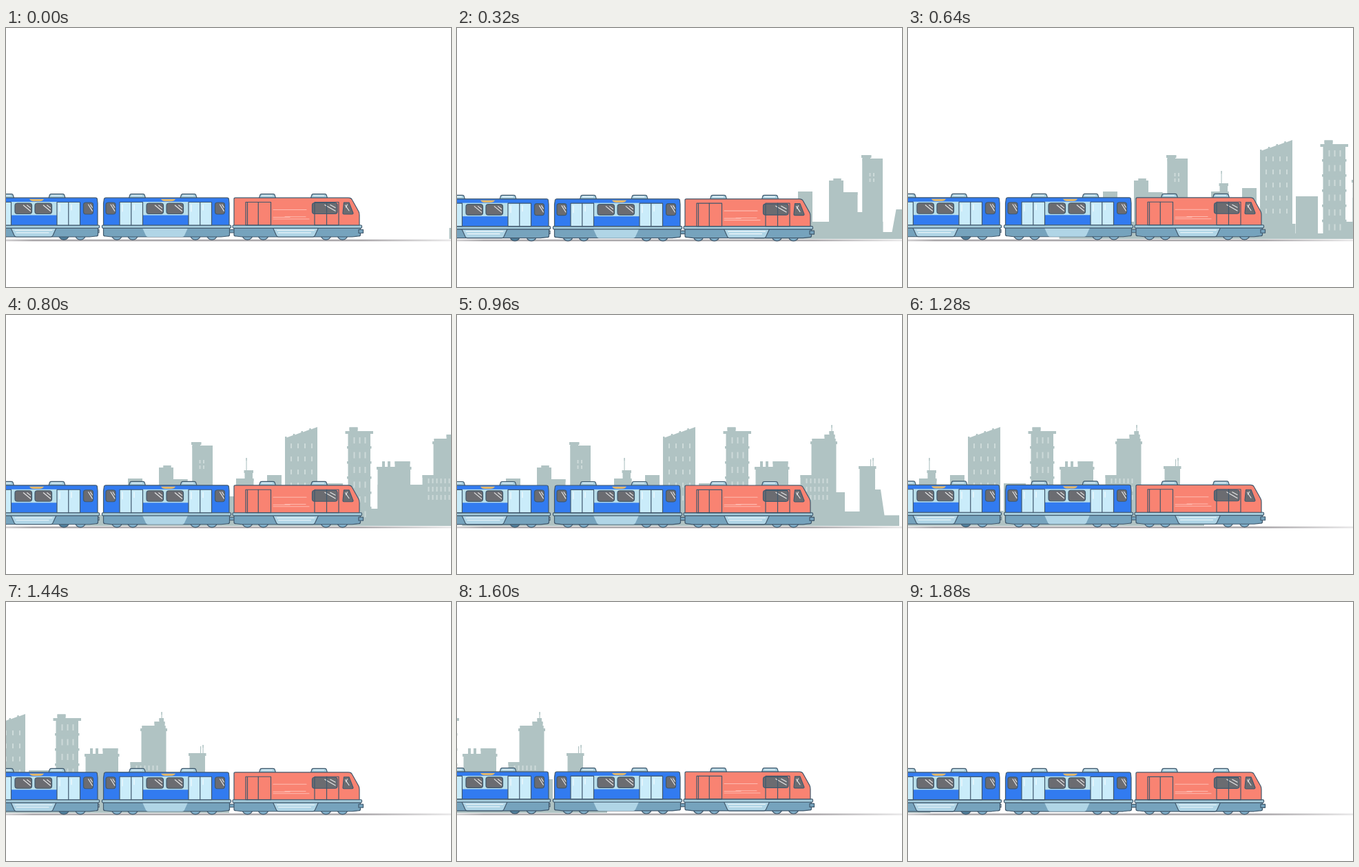
These frames come from a looping animation (646x377 px, 1.92 s). An HTML page:

```html
<!DOCTYPE html>
<html lang="en">
<head>
<meta charset="utf-8">
<title>Train</title>
<style>
  html, body { margin: 0; width: 100%; height: 100%; overflow: hidden; background: #fff; }
  svg { display: block; width: 646px; height: 377px; }
  .line { stroke: #41596d; stroke-width: 1.2; stroke-linejoin: round; stroke-linecap: round; }
  .shine, .streak { stroke: #fff; stroke-width: 1.1; stroke-linecap: round; opacity: .85; }
  .streak { stroke: #ffc6bc; }
</style>
</head>
<body>
<svg viewBox="0 0 646 377">
  <defs>
    <linearGradient id="fade">
      <stop offset="0" stop-color="#aaa7aa" stop-opacity=".55"/>
      <stop offset=".06" stop-color="#aaa7aa"/>
      <stop offset=".8" stop-color="#aaa7aa"/>
      <stop offset="1" stop-color="#aaa7aa" stop-opacity=".25"/>
    </linearGradient>
  </defs>
  <rect y="307.8" width="646" height="2.6" fill="url(#fade)"/>
  <g id="city"></g>
  <g id="train"></g>
</svg>
<script>
const STEP = 40, COUNT = 48;
const CITY_START = 643.5, CITY_SPEED = 26.5;
const GROUND = 307, FLOOR = 287;

const STONE = '#b0c3c3', PANE = '#cddad9';
const BLUE = '#327bf0', RED = '#f98372', GLASS = '#6b6c71';
const BAR = '#a6cddd', SKIRT = '#76a3bd', PALE = '#b0d5e6', WHEEL = '#83b2cd', DARK_WHEEL = '#4f7f9c';

const path = (d, fill = 'none', cls = '') => `<path d="${d}" fill="${fill}" class="${cls}"/>`;
const line = (d, cls = 'line') => path(d, 'none', cls);
const rect = (x, y, w, h, fill, cls = '', r = 0) =>
  `<rect x="${x}" y="${y}" width="${w}" height="${h}" rx="${r}" fill="${fill}" class="${cls}"/>`;
const repeat = (n, make) => Array.from({ length: n }, (_, i) => make(i)).join('');

// A building down to the ground; its cornice sticks out on both sides
const tower = (x, w, top, cornice = 0) =>
  rect(x, top, w, GROUND - top, STONE) + rect(x - cornice, top, w + 2 * cornice, 4, STONE);
const spire = (x, top) => tower(x, 1.1, top);
const panes = (x, y, cols, rows, dx, dy, h) =>
  repeat(rows, r => repeat(cols, c => rect(x + c * dx, y + r * dy, 2, h, PANE)));

// Saw-toothed roof climbing to the right
function sawTower(x, w, top, teeth) {
  const run = w / teeth;
  const roof = repeat(teeth, i => `L${x + i * run} ${top - 4 * i}h2.5v1.5L${x + (i + 1) * run} ${top - 4 * i - 2}`);
  return path(`M${x} ${GROUND}${roof}V${GROUND}Z`, STONE) + panes(x + 8, top + 10, teeth, 5, 10, 19, 7);
}

function balconyTower(x, w, top) {
  return tower(x, w, top, 4) + tower(x + 2, 12, top - 5.5) +
    repeat(5, i => rect(x - 1.5, top + 22 * (i + 1), w + 3, 3.5, STONE)) +
    panes(x + 8, top + 9, 3, 6, 8, 21.5, 9);
}

function city() {
  const ground = 'M0 307V291H64V282H149V268H158V282H187V297H200L206 264H250V285H343V299H414V282H426V247H495V258H555.5V286H578V254H607.5L613 291.5H634.5V307Z';
  return path(ground, STONE) +
    tower(63.5, 21, 238) +
    tower(108.5, 21, 222) + tower(115, 11, 219) + tower(129, 21, 239) +
    tower(157, 29.5, 190) + tower(157, 11.5, 185, 1.5) + panes(167, 211, 2, 2, 5.5, 8, 5) +
    tower(220.5, 25.5, 238) + tower(233, 11.5, 226, 1) + spire(235, 208) +
    tower(265.5, 21, 233) +
    sawTower(291.5, 47, 177, 4) +
    tower(343.5, 32, 245) +
    balconyTower(383, 32.5, 169) +
    tower(426, 47.5, 221, 1.5) + tower(432.5, 4, 213) + tower(440.5, 4, 213) + tower(451, 22, 213) +
    tower(491, 17, 233) + tower(508, 34, 180) + tower(507, 36, 184, 1.5) +
    tower(526, 15, 174) + tower(533, 6.5, 169) + spire(536, 160) + panes(499, 238, 6, 3, 6, 12, 7) +
    tower(577, 22.5, 220, 1.5) + spire(592.5, 210) + spire(596, 208);
}

const roofBox = x =>
  path(`M${x} 247.5l1.5-4.8q.5-1 2.5-1h16q2 0 2.5 1l1.5 4.8Z`, BAR, 'line') + line(`M${x + 4} 244h15`, 'shine');

const wheel = (x, fill = WHEEL) => `<circle cx="${x}" cy="300.7" r="7.6" fill="${fill}" class="line"/>`;

const glass = (x, y, w, h) =>
  rect(x, y, w, h, GLASS, 'line', 3.5) +
  line(`M${x + w * .5} ${y + 3}l${w * .42} ${h * .55}M${x + w * .72} ${y + 3}l${w * .2} ${h * .25}`, 'shine');

const door = (x, w, fill = 'none') =>
  rect(x, 253.5, w, FLOOR - 253.5, fill, 'line') + line(`M${x + w / 2} 253.5V${FLOOR}`);

// Wheels, skirt with its tapered middle panel, and the floor bar
function chassis(x, w, panel, edged, rearWheel) {
  let out = wheel(panel - 37) + wheel(panel - 14) + wheel(panel + 77, rearWheel) + wheel(panel + 101);
  out += path(`M${x + 2} 291h${w - 4}v10q0 2-3 2l-9 1H${x + 14}l-9-1q-3 0-3-2Z`, SKIRT, 'line');
  out += path(`M${panel} 291h66l-5 11q-1 2-3 2h-50q-2 0-3-2Z`, PALE, edged ? 'line' : '');
  if (edged) out += line(`M${panel + 6} 294.5h54m-52 3.5h47`, 'shine');
  return out + rect(x, FLOOR, w, 4.3, BAR, 'line', 1.2);
}

function coach(dx, edged) {
  const pair = (x, make) => make(x) + make(x + 100);
  const out = chassis(139.5, 187, 198, edged, edged ? DARK_WHEEL : WHEEL) +
    roofBox(178.5) + roofBox(253) +
    path(`M141.5 ${FLOOR}V255l1-6.5q.5-1.3 2.5-1.3h176q2 0 2.3 1.3l.7 6.5V${FLOOR}Z`, BLUE, 'line') +
    rect(199, 253, 66, 19.5, '#b9dfeb') +
    path('M225 249h21q-2 3.3-6 3.3h-9q-4 0-6-3.3Z', '#e3b768') +
    pair(165, x => door(x, 33.5, '#caecfa') + line(`M${x + 4} 257v10m17-10v8`, 'shine')) +
    glass(204, 255, 24.5, 15.5) + glass(233, 255, 24.5, 15.5) +
    glass(145, 254, 14, 17) + glass(303.5, 254, 14, 17);
  return `<g transform="translate(${dx} 0)">${out}</g>`;
}

function engine() {
  return chassis(329, 187.5, 387.5, true) +
    rect(512, 293.5, 6.5, 5, SKIRT, 'line') +
    roofBox(367.5) + roofBox(442.5) +
    path(`M331 ${FLOOR}V249q0-1.8 2-1.8h164q4 0 5.5 3l9.5 17q1 2 1 5V${FLOOR}Z`, RED, 'line') +
    line('M388 264.5h48m-48 11h24m-24 2.5h52m-35-3.2h30', 'streak') +
    door(348, 36.5) + line(`M350.5 254V${FLOOR}`) +
    glass(444.5, 254.5, 36.5, 16) + door(448, 35) +
    path('M490.5 254h7.5l6 15.5q0 1.5-1.5 1.5h-12q-1.5 0-1.5-1.5Z', GLASS, 'line') +
    line('M492.5 258l5.5 8m-2.5-9l-2 4', 'shine');
}

const cityEl = document.getElementById('city');
const trainEl = document.getElementById('train');
cityEl.innerHTML = city();
trainEl.innerHTML =
  rect(132, 293.5, 3, 4.5, '#dfe9ee', 'line') +
  rect(324, 293.5, 8, 4.5, SKIRT, 'line') +
  coach(-191, true) + coach(0, false) + engine();

// Uneven rattle made of three waves that close over the loop
function rattle(n) {
  const a = 2 * Math.PI * n / COUNT;
  return .4 - .63 * Math.sin(4 * a) - .35 * Math.sin(5 * a) - .4 * Math.cos(9 * a);
}

function draw() {
  const n = Math.floor((performance.now() + 1) / STEP) % COUNT;
  cityEl.setAttribute('transform', `translate(${CITY_START - CITY_SPEED * n} 0)`);
  trainEl.setAttribute('transform', `translate(0 ${rattle(n)})`);
  requestAnimationFrame(draw);
}
draw();
</script>
</body>
</html>
```
